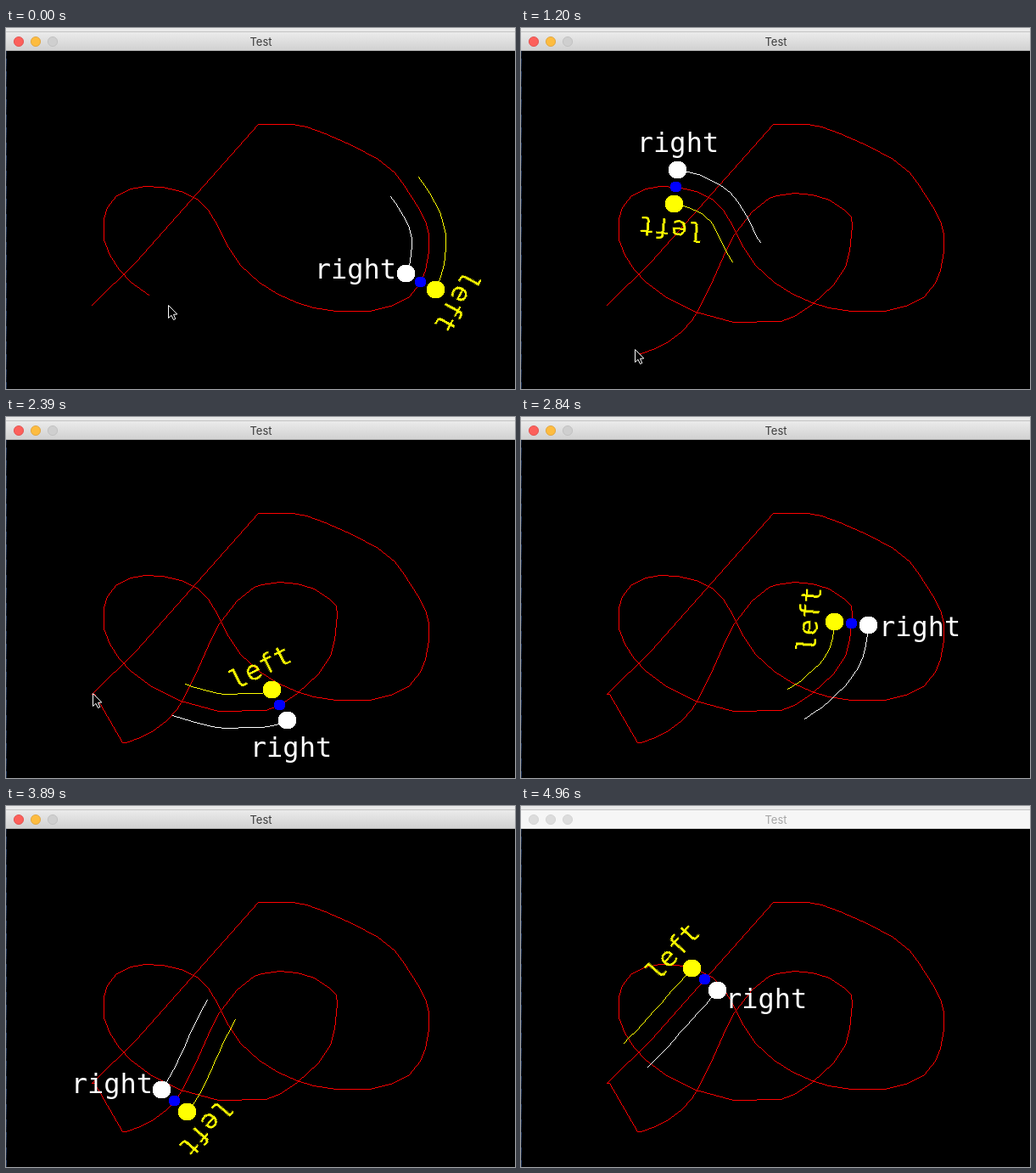
Animation of 600 by 425 pixels, one loop 5.06 s. Source, as an HTML page with a canvas:

```html
<!DOCTYPE html>
<html lang="en">
<head>
<meta charset="utf-8">
<title>Test</title>
<style>
  html, body { margin: 0; width: 100%; height: 100%; overflow: hidden; background: #000; }
  canvas { display: block; }
</style>
</head>
<body>
<canvas id="stage" width="600" height="425"></canvas>
<script>
const LOOP = 5060, OFFSET = 20, TRAIL = 121;
const ctx = document.getElementById('stage').getContext('2d');
const LABEL_FONT = '32px "DejaVu Sans Mono", monospace';

const coords = [
  101,326, 153,275, 297,113, 338,113, 354,116, 376,124, 408,138, 438,154, 458,170, 469,185,
  485,210, 494,227, 498,243, 498,263, 494,285, 488,300, 475,316, 456,326, 429,333, 389,333,
  362,329, 343,323, 320,313, 298,299, 276,279, 260,255, 249,232, 238,214, 226,202, 206,192,
  184,187, 163,186, 147,189, 130,197, 119,211, 115,224, 115,249, 122,267, 133,284, 147,299,
  170,316, 206,334, 250,346, 306,345, 322,339, 343,325, 368,302, 382,281, 387,262, 390,232,
  389,222, 381,214, 363,202, 343,196, 322,194, 301,197, 292,200, 272,216, 251,243, 238,269,
  222,305, 206,336, 201,344, 189,357, 173,369, 158,377, 141,383, 137,383, 104,326, 102,326
];
const path = [];
let total = 0;
for (let i = 0; i < coords.length; i += 2) {
  const x = coords[i], y = coords[i + 1], last = path[path.length - 1];
  if (last) total += Math.hypot(x - last.x, y - last.y);
  path.push({ x, y, s: total });
}

// Point at arc length s on the closed track
function at(s) {
  s = ((s % total) + total) % total;
  let i = 1;
  while (i < path.length - 1 && path[i].s < s) i++;
  const a = path[i - 1], b = path[i], k = (s - a.s) / (b.s - a.s);
  return { x: a.x + (b.x - a.x) * k, y: a.y + (b.y - a.y) * k };
}

function heading(s) {
  const a = at(s - 7), b = at(s + 7);
  return Math.atan2(b.y - a.y, b.x - a.x);
}

// Arc length of the track point closest to (x, y)
function near(x, y, from, to) {
  let best = from, min = Infinity;
  for (let s = from; s <= to; s += 0.5) {
    const p = at(s), d = Math.hypot(p.x - x, p.y - y);
    if (d < min) { min = d; best = s; }
  }
  return best;
}

function keys(list, from) {
  return list.map(([t, x, y]) => {
    from = near(x, y, from, Math.min(from + 700, total - 0.5));
    return [t, from];
  });
}

function mix(list, t) {
  for (let i = 1; i < list.length; i++) {
    const [t0, s0] = list[i - 1], [t1, s1] = list[i];
    if (t <= t1) return s0 + (s1 - s0) * Math.max(0, t - t0) / (t1 - t0);
  }
  return list[list.length - 1][1];
}

const robot = keys([[0, 487, 298], [450, 356, 327], [1200, 182, 186],
  [2390, 321, 338], [3290, 294, 198], [3890, 197, 346]], 250);
robot.push([4960, total + near(215, 203, 0, 300)]);

const pen = keys([[0, 168, 314], [450, 343, 196], [1050, 139, 383], [1340, 139, 383]], 1000);
pen.push([1940, total]);

const mouse = keys([[0, 192, 328], [450, 300, 197], [1050, 134, 379], [1340, 134, 379]], 1000);
mouse.push([1940, total - 1]);

// The picture advances in steps of about 150 ms
function step(t) {
  if (t < 1200) return Math.floor(t / 150) * 150;
  if (t < 1340) return 1200;
  if (t < 4790) return 1340 + Math.floor((t - 1340) / 150) * 150;
  return t < 4960 ? 4790 : 4960;
}

function line(a, b) {
  let x = Math.round(a.x), y = Math.round(a.y);
  const x1 = Math.round(b.x), y1 = Math.round(b.y);
  const dx = Math.abs(x1 - x), dy = -Math.abs(y1 - y);
  const sx = x < x1 ? 1 : -1, sy = y < y1 ? 1 : -1;
  let err = dx + dy;
  for (;;) {
    ctx.fillRect(x, y, 1, 1);
    if (x === x1 && y === y1) return;
    const e = 2 * err;
    if (e >= dy) { err += dy; x += sx; }
    if (e <= dx) { err += dx; y += sy; }
  }
}

function polyline(points, color) {
  ctx.fillStyle = color;
  for (let i = 1; i < points.length; i++) line(points[i - 1], points[i]);
}

function disc(p, r, color) {
  const x = Math.round(p.x), y = Math.round(p.y);
  ctx.fillStyle = color;
  for (let j = -r; j < r; j++) {
    const w = Math.round(Math.sqrt((r + 0.4) ** 2 - (j + 0.5) ** 2));
    ctx.fillRect(x - w, y + j, 2 * w + 1, 1);
  }
}

// side: -1 left of the track, 1 right of it
function beside(s, side) {
  const p = at(s), a = heading(s);
  return { x: p.x - Math.sin(a) * OFFSET * side, y: p.y + Math.cos(a) * OFFSET * side };
}

function trail(s, side, color) {
  const points = [];
  for (let d = 0; d <= TRAIL; d += 11) points.push(beside(s - d, side));
  polyline(points, color);
}

const leftText = document.createElement('canvas');
leftText.width = 84;
leftText.height = 44;
const lt = leftText.getContext('2d');
lt.font = LABEL_FONT;
lt.textAlign = 'center';
lt.fillStyle = '#ff0';
lt.fillText('left', 42, 32);

function leftLabel(p, a) {
  ctx.save();
  ctx.translate(Math.round(p.x), Math.round(p.y));
  ctx.rotate(a);
  ctx.imageSmoothingEnabled = false;
  ctx.drawImage(leftText, -42, -50.5);
  ctx.restore();
}

function rightLabel(p, a) {
  const nx = -Math.sin(a), ny = Math.cos(a);
  const side = Math.abs(nx) > 0.64;
  ctx.font = LABEL_FONT;
  ctx.fillStyle = '#fff';
  ctx.textAlign = !side ? 'center' : nx > 0 ? 'left' : 'right';
  const base = side ? 12 : ny < 0 ? -8 : 31;
  ctx.fillText('right', Math.round(p.x + nx * 13), Math.round(p.y + ny * 13 + base));
}

function dot(x, color, edge) {
  ctx.beginPath();
  ctx.arc(x, 16, 5.6, 0, 7);
  ctx.fillStyle = color;
  ctx.fill();
  ctx.strokeStyle = edge;
  ctx.lineWidth = 0.8;
  ctx.stroke();
}

function titleBar(active) {
  ctx.fillStyle = '#e9e9e9';
  ctx.fillRect(0, 0, 600, 6);
  ctx.fillStyle = '#c4c4c4';
  ctx.fillRect(0, 4, 600, 1);
  const g = ctx.createLinearGradient(0, 5, 0, 27);
  g.addColorStop(0, active ? '#ebebeb' : '#f6f6f6');
  g.addColorStop(1, active ? '#d0d0d0' : '#f6f6f6');
  ctx.fillStyle = g;
  ctx.fillRect(0, 5, 600, 22);
  ctx.fillStyle = active ? '#b2b2b2' : '#d4d4d4';
  ctx.fillRect(0, 26, 600, 1);
  dot(15, active ? '#fc605b' : '#dcdcdc', active ? '#df4744' : '#d0d0d0');
  dot(35, active ? '#fdbc40' : '#dcdcdc', active ? '#de9f34' : '#d0d0d0');
  dot(55, active ? '#cfcfcf' : '#dcdcdc', active ? '#bdbdbd' : '#d0d0d0');
  ctx.font = '13px Inter, sans-serif';
  ctx.textAlign = 'center';
  ctx.fillStyle = active ? '#3c3c3c' : '#a6a6a6';
  ctx.fillText('Test', 300.5, 21);
}

// Thin strip of desktop at the left edge
function desktopEdge() {
  for (let y = 6; y < 425; y += 3) {
    const v = 20 + (y * 37 % 61) * 0.7;
    ctx.fillStyle = `rgb(${v * 0.6 | 0},${v | 0},${v * 1.7 | 0})`;
    ctx.fillRect(0, y, 1, 3);
  }
}

function cursor(p) {
  ctx.save();
  ctx.translate(Math.round(p.x) - 0.5, Math.round(p.y) - 0.5);
  ctx.beginPath();
  [[0, 0], [0, 15], [3.5, 11.8], [6, 17], [8.3, 16], [6, 10.8], [10.3, 10.5]]
    .forEach(([x, y]) => ctx.lineTo(x, y));
  ctx.closePath();
  ctx.fillStyle = '#000';
  ctx.fill();
  ctx.strokeStyle = '#fff';
  ctx.lineWidth = 1;
  ctx.stroke();
  ctx.restore();
}

function draw(t) {
  ctx.fillStyle = '#000';
  ctx.fillRect(0, 0, 600, 425);
  desktopEdge();
  titleBar(t < 4960);

  const end = mix(pen, t);
  const drawn = path.filter(p => p.s <= end);
  if (end < total) drawn.push(at(end));
  polyline(drawn, '#f00');

  const s = mix(robot, t), a = heading(s);
  const left = beside(s, -1), right = beside(s, 1);
  trail(s, -1, '#ff0');
  trail(s, 1, '#fff');
  disc(at(s), 6, '#00f');
  disc(left, 10, '#ff0');
  disc(right, 10, '#fff');
  leftLabel(left, a);
  rightLabel(right, a);
  if (t < 2690) cursor(at(mix(mouse, t)));
}

const start = performance.now();
function tick(now) {
  draw(step(Math.max(0, now - start) % LOOP));
  requestAnimationFrame(tick);
}
draw(0);
requestAnimationFrame(tick);
</script>
</body>
</html>
```
